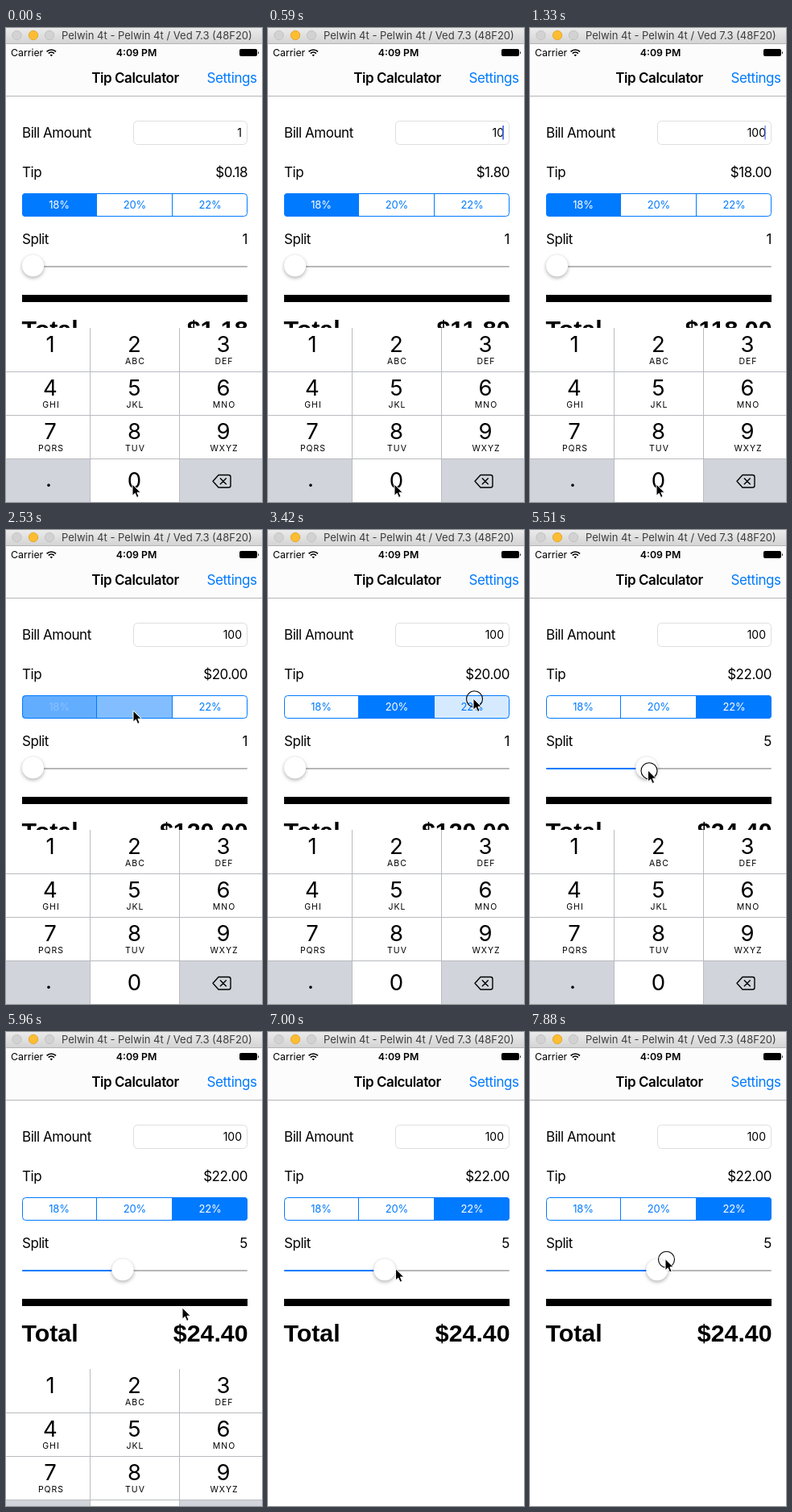
An HTML page that plays this animation: 318 px wide and 588 px high, repeating every 8 s.

```html
<!DOCTYPE html>
<html lang="en">
<head>
<meta charset="utf-8">
<title>Tip Calculator</title>
<style>
  html, body { margin: 0; width: 100%; height: 100%; overflow: hidden; background: #fff; }
  svg { display: block; width: 318px; height: 588px; font: 17px Inter, sans-serif; letter-spacing: -.45px; }
  .end { text-anchor: end; }
  .mid { text-anchor: middle; }
  .blue { fill: #007aff; }
  .small { font-size: 12.3px; letter-spacing: 0; }
  .bold { font-weight: 600; }
  .total { font: bold 30.3px "Liberation Sans", Arial, sans-serif; letter-spacing: 0; }
  .seg { font-size: 13px; letter-spacing: -.2px; }
  .digit { font-size: 27.5px; letter-spacing: 0; }
  .abc { font-size: 10.5px; letter-spacing: 1px; }
  .line { fill: none; stroke: #b9bbbf; }
  #thumb { filter: drop-shadow(0 2.5px 2px rgba(0,0,0,.28)); }
</style>
</head>
<body>
<svg viewBox="0 0 318 588">
  <defs>
    <linearGradient id="chrome" x2="0" y2="1">
      <stop stop-color="#ebebeb"/><stop offset="1" stop-color="#d3d3d3"/>
    </linearGradient>
    <clipPath id="pill"><rect x="20" y="205" width="280" height="29" rx="4"/></clipPath>
  </defs>
  <rect width="318" height="588" fill="#fff"/>

  <rect y="20" width="318" height="64" fill="#fcfcfc"/>
  <path d="M0 84.5H318" stroke="#b6b6b6"/>
  <rect width="318" height="20" fill="url(#chrome)"/>
  <path d="M0 19.5H318" stroke="#b4b4b4"/>
  <g stroke-width=".8">
    <circle cx="13.5" cy="9" r="5.7" fill="#d2d2d2" stroke="#bdbdbd"/>
    <circle cx="34" cy="9" r="5.7" fill="#fdbd32" stroke="#dfa023"/>
    <circle cx="54" cy="9" r="5.7" fill="#d2d2d2" stroke="#bdbdbd"/>
  </g>
  <text x="69" y="14" fill="#3c3c3c" style="font-size:13px;letter-spacing:0">Pelwin 4t - Pelwin 4t / Ved 7.3 (48F20)</text>

  <text x="6" y="34.5" class="small">Carrier</text>
  <g fill="none" stroke="#000" stroke-width="1.7">
    <path d="M50.6 29.4a8 8 0 0 1 11.4 0M52.8 31.6a5 5 0 0 1 7 0"/>
    <path d="M56.3 35.2l-1.7-1.7a2.4 2.4 0 0 1 3.4 0z" fill="#000" stroke="none"/>
  </g>
  <text x="162" y="34.5" class="small bold mid">4:09 PM</text>
  <rect x="290" y="26" width="22" height="9" rx="2"/>
  <path d="M313 28.5q1.8 2 0 4z"/>

  <text x="160.5" y="68" class="bold mid">Tip Calculator</text>
  <text x="311.5" y="68" class="blue end">Settings</text>

  <text x="20" y="135.5">Bill Amount</text>
  <rect x="158.5" y="115.5" width="141" height="29" rx="5" fill="#fff" stroke="#dedede"/>
  <text id="bill" x="293" y="134.5" class="end" style="font-size:14px;letter-spacing:0"></text>
  <rect id="caret" x="291.2" y="121" width="1.8" height="17.5" fill="#4a74ea"/>

  <text x="20" y="184.5">Tip</text>
  <text id="tip" x="300" y="184.5" class="end"></text>

  <g id="segs" clip-path="url(#pill)"></g>
  <path d="M112.5 205V234M206.5 205V234" stroke="#007aff"/>
  <rect x="20.5" y="205.5" width="279" height="28" rx="4" fill="none" stroke="#007aff"/>

  <text x="20" y="267.5">Split</text>
  <text id="split" x="300" y="267.5" class="end"></text>
  <rect x="20" y="295" width="280" height="2" rx="1" fill="#b7b7b7"/>
  <rect id="fill" x="20" y="295" height="2" rx="1" class="blue"/>
  <circle id="thumb" cy="294.7" r="13.8" fill="#fff" stroke="#000" stroke-opacity=".1" stroke-width=".5"/>

  <rect x="20" y="331" width="280" height="9"/>
  <text x="19.5" y="384" class="total">Total</text>
  <text id="total" x="300.5" y="384" class="total end"></text>

  <g id="pad">
    <rect y="372" width="318" height="216" fill="#fff"/>
    <path d="M0 534H104V588H0zM215 534H318V588H215z" fill="#d1d5db"/>
    <rect id="zero" x="105" y="535" width="110" height="53" fill="#d1d5db"/>
    <path class="line" d="M0 426.5H318M0 480.5H318M0 534.5H318M104.5 372V588M215.5 372V588"/>
    <g id="keys"></g>
    <text x="53" y="569" class="digit mid">.</text>
    <path d="M264 554.5H276.5q2.5 0 2.5 2.5V567.500q0 2.500-2.500 2.500H264L257 562.300zM266.300 558.800l7 7m0-7l-7 7" fill="none" stroke="#000" stroke-width="1.4" stroke-linejoin="round" stroke-linecap="round"/>
  </g>

  <g id="mouse">
    <circle id="ring" cx="1.500" cy=".8" r="10" fill="none" stroke="#000" stroke-width="1.1"/>
    <path d="M0 0V14.200L3.300 11.200L5.600 16.400L8.100 15.300L5.900 10.200H10.300Z" stroke="#fff" stroke-width="1"/>
  </g>
</svg>
<script>
const LOOP = 8000, STEP = 148.94;
const $ = id => document.getElementById(id);
const money = v => '$' + v.toFixed(2);
const within = (k, a, b) => k >= a && k <= b;

function add(parent, tag, attrs, text = '') {
  const el = document.createElementNS('http://www.w3.org/2000/svg', tag);
  for (const name in attrs) el.setAttribute(name, attrs[name]);
  el.textContent = text;
  return parent.appendChild(el);
}

// keypad
const columns = [55.5, 160, 270.5];
['', 'ABC', 'DEF', 'GHI', 'JKL', 'MNO', 'PQRS', 'TUV', 'WXYZ'].forEach((abc, i) => {
  const x = columns[i % 3], y = 402 + 54 * Math.floor(i / 3);
  add($('keys'), 'text', { x: x - .5, y, class: 'digit mid' }, i + 1);
  add($('keys'), 'text', { x: x + .5, y: y + 15, class: 'abc mid' }, abc);
});
add($('keys'), 'text', { x: 159.5, y: 571, class: 'digit mid' }, 0);

// segmented control
const rates = [18, 20, 22];
const edges = [20, 112.5, 206.5, 300];
const segs = rates.map((rate, i) => ({
  box: add($('segs'), 'rect', { x: edges[i], y: 205, width: edges[i + 1] - edges[i], height: 29, class: 'blue' }),
  label: add($('segs'), 'text', { x: [66, 160, 253.5][i], y: 224, class: 'seg mid' }, rate + '%')
}));

// pointer path: step, x, y
const path = [
  [0, 157, 566], [11, 157, 566], [16, 158, 224], [18, 158, 224],
  [23, 255, 209], [26, 255, 209], [30, 19, 311], [32, 35, 299], [33, 35, 299],
  [37, 146.5, 298], [39, 219, 342], [41, 219, 342], [48, 155, 291],
  [49, 155, 291], [51, 62, 288], [53, 168, 281.5]
];
function pointer(k) {
  let i = 1;
  while (i < path.length - 1 && path[i][0] < k) i++;
  const [k0, x0, y0] = path[i - 1], [k1, x1, y1] = path[i];
  const u = (k - k0) / (k1 - k0), e = u * u * (3 - 2 * u);
  return [x0 + (x1 - x0) * e, y0 + (y1 - y0) * e];
}

function thumbX(k, x) {
  if (k < 33) return 33.5;
  if (k <= 37) return x - 1.5;
  return k < 49 ? 145 : x - 10;
}

function caretAlpha(k, t) {
  if (k < 1 || k > 38) return 0;
  if (k < 9) return 1;
  const p = (t - 1320) % 1000;
  return p < 80 ? .65 : p < 425 ? 0 : 1;
}

const slide = k => k < 40 ? 0 : k === 40 ? 46 : k === 41 ? 190 : 216;
const pressed = k => [1, 4, 16, 23, 39].includes(k) || within(k, 33, 37) || k >= 49;

function paintSegs(k, active) {
  const fading = k === 17 || k === 24;
  const touched = k === 16 ? 1 : k === 23 ? 2 : -1;
  segs.forEach(({ box, label }, i) => {
    const on = i === active, leaving = fading && i === active - 1;
    const alpha = leaving ? .61 : on ? (fading ? .49 : 1) : i === touched ? .16 : 0;
    box.setAttribute('fill-opacity', alpha);
    label.setAttribute('fill', leaving ? '#8cc0ff' : on ? (fading ? '#82bcff' : '#fff') : '#007aff');
  });
}

function draw(t) {
  // the screen refreshes in coarse steps
  const k = t < 880 ? Math.min(5, Math.floor(t / 150)) : 6 + Math.floor((t - 876) / STEP);
  const shown = k < 6 ? k * 150 : 880 + (k - 6) * STEP;

  const bill = k < 2 ? 1 : k < 5 ? 10 : 100;
  const active = k < 17 ? 0 : k < 24 ? 1 : 2;
  const tip = bill * rates[active] / 100;
  const [x, y] = pointer(k);
  const knob = Math.max(33.5, thumbX(k, x));
  const split = Math.round(1 + 9 * (knob - 33.5) / 253);

  $('bill').textContent = bill;
  $('tip').textContent = money(tip);
  $('split').textContent = split;
  $('total').textContent = money((bill + tip) / split);
  $('caret').setAttribute('opacity', caretAlpha(k, shown));
  $('thumb').setAttribute('cx', knob);
  $('fill').setAttribute('width', knob - 20);
  $('zero').setAttribute('opacity', k === 1 || k === 4 ? 1 : k === 2 || k === 5 ? .5 : 0);
  $('pad').setAttribute('transform', `translate(0 ${slide(k)})`);
  $('mouse').setAttribute('transform', `translate(${x} ${y})`);
  $('ring').setAttribute('opacity', pressed(k) ? 1 : 0);
  paintSegs(k, active);
}

const start = performance.now();
function tick() {
  draw((performance.now() - start) % LOOP);
  requestAnimationFrame(tick);
}
tick();
</script>
</body>
</html>
```
